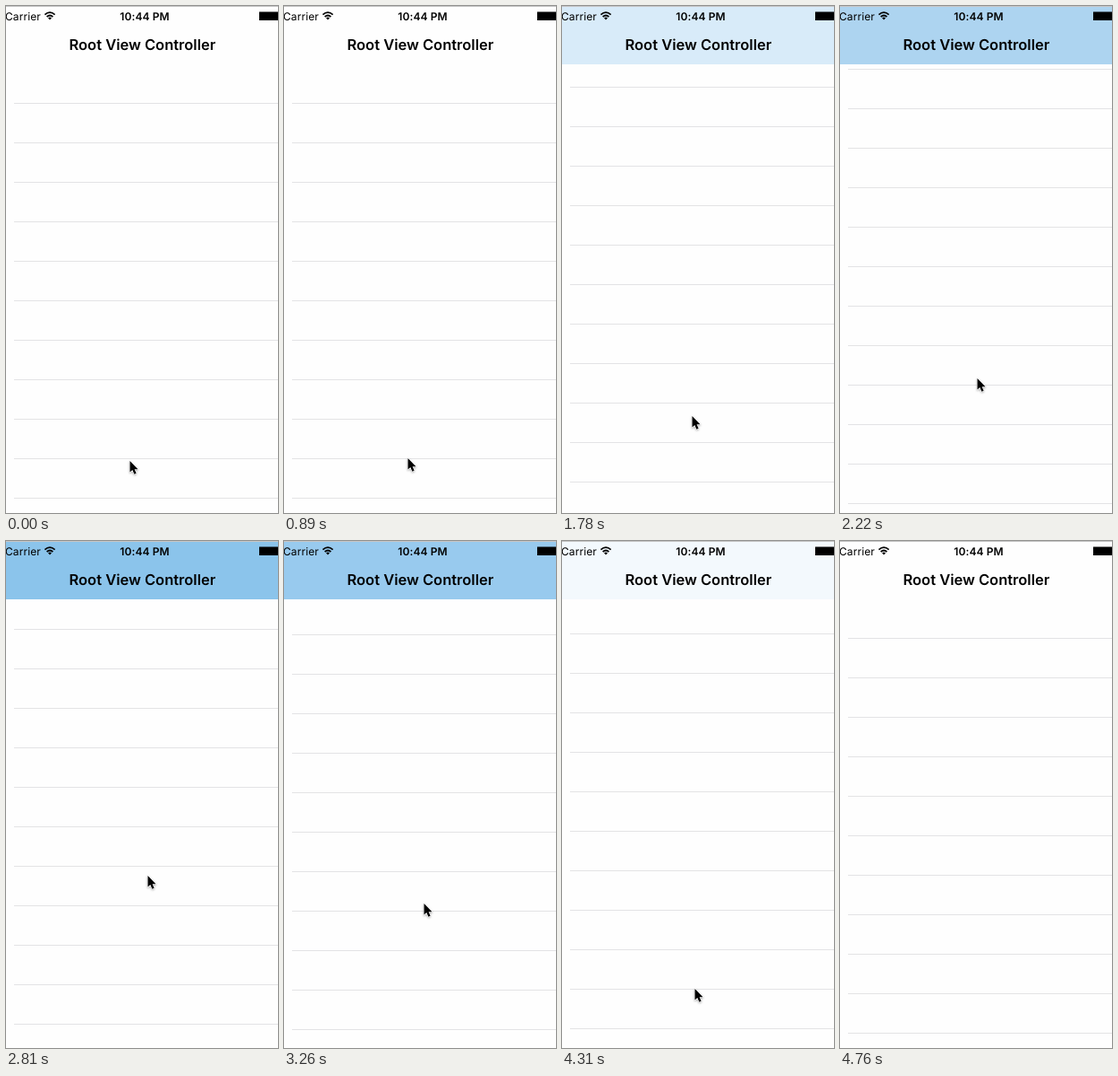
An HTML page for the animation above (4.86 s loop, 304 by 565 pixels).

```html
<!DOCTYPE html>
<html lang="en">
<head>
<meta charset="utf-8">
<title>Fading navigation bar</title>
<style>
  html, body { margin: 0; width: 100%; height: 100%; overflow: hidden; background: #fefefe; }
  #stage { position: relative; width: 304px; height: 565px; overflow: hidden; background: #fefefe; }
  #view { position: absolute; inset: 0 0 3px; overflow: hidden; }
  #list {
    position: absolute; left: 9px; right: 0; top: 65px; height: 616px;
    background: repeating-linear-gradient(transparent 0 43px, #e3e3e5 43px 44px);
  }
  #bar { position: absolute; left: 0; top: 0; width: 304px; height: 65px; background: #fefefe; }
  #tint { position: absolute; inset: 0; background: rgb(118, 185, 232); opacity: 0; }
  svg { position: absolute; left: 0; top: 0; overflow: visible; }
  text { font-family: Inter, Roboto, sans-serif; text-rendering: geometricPrecision; }
  .status { font-size: 12px; letter-spacing: .1px; }
  .bold { font-weight: 600; }
  .title { font-size: 16.5px; font-weight: 600; }
  #cursor { filter: drop-shadow(0 1px 1px rgba(0, 0, 0, .3)); }
</style>
</head>
<body>
<div id="stage">
  <div id="view"><div id="list"></div></div>
  <div id="bar">
    <div id="tint"></div>
    <svg width="304" height="65">
      <rect width="304" height="1" fill="#c6c6c6"/>
      <text class="status" x="-1" y="16">Carrier</text>
      <g fill="none" stroke="#000" stroke-width="1.7">
        <path d="M43.4 9.6 Q49 4.6 54.6 9.6"/>
        <path d="M45.6 12 Q49 9 52.4 12"/>
      </g>
      <path d="M47 13.2 Q49 11.8 51 13.2 L49 15.6Z"/>
      <text class="status bold" x="127.3" y="16">10:44 PM</text>
      <rect x="283" y="6" width="21" height="1" opacity=".5"/>
      <rect x="283" y="7" width="21" height="9"/>
      <text class="title" x="70.5" y="49">Root View Controller</text>
    </svg>
  </div>
  <svg id="cursor" width="12" height="18">
    <path d="M.5 1V13.6L3.3 11L5.4 15.8L7.6 14.8L5.6 10.2H9.5Z"
          stroke="#fff" stroke-width="1.2" stroke-linejoin="round" paint-order="stroke"/>
  </svg>
</div>
<script>
  const LOOP = 4860, START = 590, TICK = 148, HIDE = 4750, FADE = 64;

  // A slow drag up and back down; a spline joins these poses.
  const poses = [
    { t: 590, scroll: 0, x: 138, y: 506 },
    { t: 1490, scroll: 7, x: 140, y: 478 },
    { t: 2220, scroll: 38, x: 153, y: 415 },
    { t: 2810, scroll: 54, x: 158, y: 372 },
    { t: 3260, scroll: 48, x: 156, y: 402 },
    { t: 3860, scroll: 23, x: 150, y: 462 },
    { t: 4610, scroll: 0, x: 147, y: 508 }
  ];
  const last = poses.length - 1;

  const [list, tint, cursor] = ['list', 'tint', 'cursor'].map(id => document.getElementById(id));

  // The picture holds still between ticks.
  const snap = t => t < START ? START : START + Math.round(Math.floor((t - START + 8) / TICK) * TICK * 1.006);

  function slope(i, key) {
    if (i === 0 || i === last) return 0;
    const a = poses[i - 1], b = poses[i + 1];
    return (b[key] - a[key]) / (b.t - a.t);
  }

  function at(t, key) {
    const i = Math.max(0, poses.findLastIndex(p => p.t <= t));
    if (i === last) return poses[last][key];
    const a = poses[i], b = poses[i + 1], d = b.t - a.t;
    const p = (t - a.t) / d, q = 1 - p;
    return Math.round(
      a[key] * q * q * (1 + 2 * p) + b[key] * p * p * (1 + 2 * q) +
      d * p * q * (slope(i, key) * q - slope(i + 1, key) * p));
  }

  function draw(now) {
    const t = snap(now % LOOP);
    const scroll = at(t, 'scroll');
    list.style.transform = `translateY(${-scroll}px)`;
    tint.style.opacity = scroll / FADE;
    cursor.style.transform = `translate(${at(t, 'x')}px, ${at(t, 'y')}px)`;
    cursor.style.visibility = now % LOOP < HIDE ? 'visible' : 'hidden';
  }

  const origin = performance.now();
  function loop() {
    draw(performance.now() - origin);
    requestAnimationFrame(loop);
  }
  loop();
</script>
</body>
</html>
```
